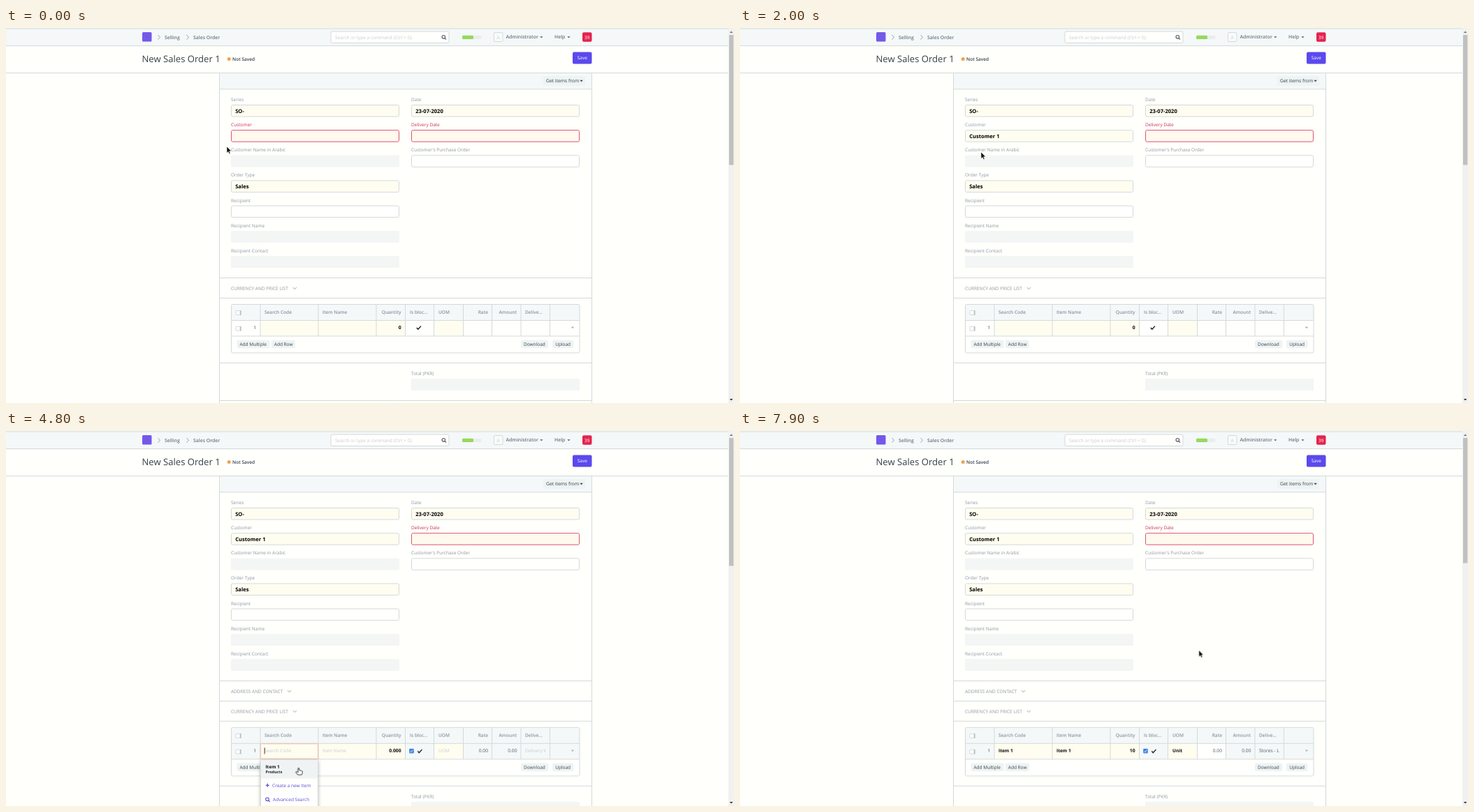
These frames come from a looping animation (1042x538 px, 8000 ms). An HTML page:

```html
<!DOCTYPE html>
<html lang="en">
<head>
<meta charset="utf-8">
<title>Sales order form</title>
<style>
  html, body { margin: 0; width: 100%; height: 100%; overflow: hidden; background: #fffffc; }
  svg { display: block; width: 100%; height: 100%; }
  text { font: 6.55px "Open Sans", "Noto Sans", sans-serif; fill: #36414c; text-rendering: geometricPrecision; white-space: pre; }
  .label { fill: #8d98a3; }
  .error { fill: #cf2f55; }
  .value { font-size: 7.6px; font-weight: 700; fill: #000; }
  .cell { font-size: 6.5px; font-weight: 700; fill: #000; }
  .qty { font-size: 6.75px; font-weight: 700; fill: #000; }
  .plain { font-size: 6.7px; fill: #4a535c; }
  .head { font-weight: 600; fill: #87929d; }
  .nav { font-size: 6.9px; font-weight: 600; fill: #6c7680; }
  .button { font-size: 6.5px; font-weight: 500; }
  .section { font-size: 6.5px; fill: #8d98a3; }
  .hint { fill: #c6ccce; }
  .option { font-size: 6.4px; font-weight: 700; fill: #111; }
  .detail { font-size: 5.53px; fill: #222; }
  .link { fill: #5b4fd8; }
  .end { text-anchor: end; }
  .line { fill: none; stroke: #d3dad9; }
  .icon { fill: none; stroke: #8d98a3; stroke-width: .9; }
  .popup { filter: drop-shadow(0 2px 2.5px rgba(0, 0, 0, .3)); }
</style>
</head>
<body>
<svg id="stage" viewBox="0 0 1042 538" xmlns="http://www.w3.org/2000/svg"></svg>
<script>
const LOOP = 8000;
const GREY = '#f4f8f8', CREAM = '#fffdf0', WHITE = '#fffffd', BORDER = '#d3dad9', PURPLE = '#5b49ee';

const text = (x, y, cls, str) => `<text x="${x}" y="${y}" class="${cls}">${str}</text>`;
const box = (x, y, w, h, fill, stroke = 'none', rx = 0, extra = '') =>
  `<rect x="${x}" y="${y}" width="${w}" height="${h}" fill="${fill}" stroke="${stroke}" rx="${rx}" ${extra}/>`;
const path = (d, cls, extra = '') => `<path d="${d}" class="${cls}" ${extra}/>`;
const rule = y => path(`M305.5 ${y}H838.5`, 'line');
const caret = (x, y) => box(x, y, .8, 9, '#000');
const button = (x, y, w, str) => box(x - 4, y - 8, w, 11.5, '#eef3f3', 'none', 2) + text(x, y, 'button', str);
const lens = (x, y, color) => `<g fill="none" stroke="${color}" stroke-width="1.1">` +
  `<circle cx="${x}" cy="${y}" r="2.3"/><path d="M${x + 1.7} ${y + 1.7}l2 2"/></g>`;
const plus = (x, y) => path(`M${x - 2.5} ${y}h5M${x} ${y - 2.5}v5`, '', 'stroke="#5b4fd8" stroke-width="1.3"');
const tick = (x, y) => path(`M${x - 3} ${y}l2 2.2l4.2 -4.6`, '', 'fill="none" stroke="#111" stroke-width="1.3"');
const caretDown = (x, y, color) => path(`M${x - 2.2} ${y}h4.4l-2.2 2.5z`, '', `fill="${color}"`);
const chevron = (x, y) => path(`M${x - 2.5} ${y - 1.2}l2.5 2.6l2.5 -2.6`, 'icon');

// Content shown only within the given [from, to) spans of the loop.
const during = (spans, ...parts) => `<g data-spans='${JSON.stringify(spans)}'>${parts.join('')}</g>`;

const LEFT = 322.5, RIGHT = 580.5;
const rowTop = i => 110.5 + i * 36.15;
const label = (x, i, str, cls = 'label') => text(x - .5, rowTop(i) - 5.6, cls, str);
const input = (x, i, fill, stroke = BORDER) => box(x, rowTop(i), 240, 16.5, fill, stroke, 2);
const value = (x, i, str) => text(x + 5.7, rowTop(i) + 11, 'value', str);
const readOnly = (x, y) => box(x - .5, y - .3, 241, 17, '#f4f5f5', 'none', 1.5);

function header() {
  return box(0, 0, 1035, 25.5, GREY) + path('M0 1H1035M0 25.5H1035M0 64.5H1035', 'line') +
    box(195, 6, 13.5, 13.5, '#7459e8', 'none', 1.5) +
    path('M217.5 10l3 3.3l-3 3.3M258.5 10l3 3.3l-3 3.3', 'icon') +
    text(227, 15.8, 'nav', 'Selling') + text(268, 15.8, 'nav', 'Sales Order') +
    box(465, 5, 169, 16.5, WHITE, BORDER, 2) +
    text(471, 15.7, 'hint', 'Search or type a command (Ctrl + G)') + lens(626.3, 12.8, '#555e66') +
    box(653, 10.8, 27.5, 5.2, '#e9eded', 'none', 1.5) + box(653, 10.8, 16, 5.2, '#98d85b', 'none', 1.5) +
    box(698.5, 6.5, 12.5, 13, '#f9fbfb', BORDER, 1.5) +
    `<text x="704.7" y="16" class="hint" text-anchor="middle">A</text>` +
    text(715.5, 15.3, 'nav', 'Administrator') + caretDown(766.3, 12, '#6c7680') +
    text(785, 15.3, 'nav', 'Help') + caretDown(805.5, 12, '#6c7680') +
    box(825, 6.3, 13.5, 13.5, '#e3244f', 'none', 2) +
    `<text x="831.7" y="15.5" text-anchor="middle" style="fill:#fff">39</text>` +
    `<text x="194.5" y="49" style="font-size:13.1px;font-weight:500">New Sales Order 1</text>` +
    '<circle cx="319.2" cy="44.6" r="2.5" fill="#f5a04c"/>' +
    `<text x="324" y="46.9" style="font-weight:600">Not Saved</text>` +
    box(811, 34.5, 27.5, 17, PURPLE, 'none', 2) +
    `<text x="824.8" y="45.2" text-anchor="middle" style="fill:#fff">Save</text>`;
}

function form() {
  const red = '#dd5570';
  return box(306, 65, 532, 23, GREY) + path('M305.5 64.5V538M838.5 64.5V538', 'line') + rule(87.8) +
    box(769, 69, 60, 13.5, '#eef3f3', 'none', 2) +
    `<text x="773" y="78" class="button" style="font-size:6.75px">Get items from</text>` + caretDown(823.6, 74.8, '#36414c') +
    label(LEFT, 0, 'Series') + input(LEFT, 0, CREAM) + value(LEFT, 0, 'SO-') +
    label(RIGHT, 0, 'Date') + input(RIGHT, 0, CREAM) + value(RIGHT, 0, '23-07-2020') +
    during([[0, 2000]], label(LEFT, 1, 'Customer', 'error'), input(LEFT, 1, '#fff9ee', red)) +
    during([[400, 2000]], box(LEFT, rowTop(1), 240, 16.5, 'none', '#f7c5cd', 2, 'stroke-width="3.5"'),
      input(LEFT, 1, '#fffaf0', '#d23455')) +
    during([[500, 900], [1500, 2000]], caret(328.4, 150)) +
    during([[2000, LOOP]], label(LEFT, 1, 'Customer'), input(LEFT, 1, CREAM), value(LEFT, 1, 'Customer 1')) +
    during([[2300, 3300]], path('M553.3 154.8h4.2', '', 'stroke="#111" stroke-width="1.7"') +
      path('M556 151.8l3.3 3l-3.3 3z', '', 'fill="#111"')) +
    label(RIGHT, 1, 'Delivery Date', 'error') + input(RIGHT, 1, '#fff9ee', red) +
    label(LEFT, 2, 'Customer Name in Arabic') + readOnly(LEFT, rowTop(2)) +
    label(RIGHT, 2, 'Customer\u2019s Purchase Order'.replace('\u2019', "'")) + input(RIGHT, 2, WHITE) +
    label(LEFT, 3, 'Order Type') + input(LEFT, 3, CREAM) + value(LEFT, 3, 'Sales') +
    label(LEFT, 4, 'Recipient') + input(LEFT, 4, WHITE) +
    label(LEFT, 5, 'Recipient Name') + readOnly(LEFT, rowTop(5)) +
    label(LEFT, 6, 'Recipient Contact') + readOnly(LEFT, rowTop(6)) +
    rule(358.5) +
    during([[2100, LOOP]], text(322, 375.8, 'section', 'ADDRESS AND CONTACT'), chevron(405.5, 373.3), rule(387.5));
}

const COLS = [322.5, 364, 447, 530, 571.5, 612.5, 654.5, 695.5, 737, 778.5, 821];
const HEAD_Y = 397, ROW_Y = 419.5, BASE = 432.3;

const fills = colors => colors.map((c, i) =>
  box(COLS[i], ROW_Y, COLS[i + 1] - COLS[i], 22.5, c)).join('');
const rowCheck = y => box(329, y, 6, 6, WHITE, '#c5cbcc', 1, 'stroke-width=".7"') + box(335.3, y - .3, 1.2, 6.8, '#a9b0b3');

function table() {
  const W = WHITE, C = CREAM, G = GREY;
  const heads = [[370, 'Search Code'], [453, 'Item Name'], [565.5, 'Quantity', 1], [578, 'Is bloc...'],
    [619, 'UOM'], [690, 'Rate', 1], [731, 'Amount', 1], [743, 'Delive...']];
  const zero = text(690, BASE, 'plain end', '0.00') + text(731.5, BASE, 'plain end', '0.00');
  return text(322, 375.8, 'section', 'CURRENCY AND PRICE LIST') + chevron(413.3, 373.3) + rule(387.5) +
    box(322.5, HEAD_Y, 498.5, 69, WHITE, 'none', 2) + box(322.5, HEAD_Y, 498.5, 22.5, GREY) +
    during([[0, 2100]], fills([W, C, C, C, W, C, W, W, W, W])) +
    during([[2100, 5300]], fills([G, C, C, C, G, C, G, G, G, G])) +
    during([[5300, LOOP]], fills([G, C, C, C, G, C, W, G, G, G])) +
    path(COLS.slice(1, -1).map(x => `M${x} ${HEAD_Y}V442`).join('') + 'M322.5 419.5H821M322.5 442H821', 'line') +
    box(322.5, HEAD_Y - .5, 498.5, 69.5, 'none', BORDER, 2) +
    heads.map(([x, str, end]) => text(x, 409.6, end ? 'head end' : 'head', str)).join('') +
    rowCheck(405.5) + rowCheck(428.3) + text(354.2, BASE, '', '1') + caretDown(811, 428.8, '#a9b0b3') +
    during([[0, 3300]], text(565.5, BASE, 'qty end', '0'), tick(590.8, 430)) +
    during([[3300, LOOP]], box(577.2, 427, 6.6, 6.6, '#3a80e0', 'none', 1),
      path('M578.7 430.3l1.3 1.4l2.4 -2.9', '', 'fill="none" stroke="#fff"'), tick(592.3, 430.5), zero) +
    during([[3700, 5700]], box(364.3, 419.8, 82.4, 21.9, 'none', '#f0b9a4', 1)) +
    during([[3300, 5000]], text(370, BASE, 'hint', 'Search Code')) +
    during([[3700, 5000]], caret(369.7, 425.5)) +
    during([[3300, 5300]], text(453, BASE, 'hint', 'Item Name'), text(565.5, BASE, 'qty end', '0.000'),
      text(619, BASE, 'hint', 'UOM'), `<g clip-path="url(#cellClip)">${text(743, BASE, 'hint', 'Delivery W')}</g>`) +
    during([[5000, LOOP]], text(370, BASE, 'cell', 'Item 1')) +
    during([[5300, LOOP]], text(453, BASE, 'cell', 'Item 1'), text(619, BASE, 'cell', 'Unit'),
      text(743, BASE, 'plain', 'Stores - L')) +
    during([[5300, 6800]], text(565.5, BASE, 'qty end', '1.000')) +
    during([[5800, 6000]], caret(547.9, 425.5)) +
    during([[6000, 6800]], box(548, 426, 18, 8.5, '#3390ff'),
      `<text x="565.5" y="${BASE}" class="qty end" style="fill:#fff">1.000</text>`) +
    during([[6800, 7000]], text(565.5, BASE, 'qty end', '1')) +
    during([[7000, LOOP]], text(565.5, BASE, 'qty end', '10')) +
    during([[6800, 7600]], caret(565.7, 425.5)) +
    button(334.5, 455.8, 47, 'Add Multiple') + button(383.8, 455.8, 34, 'Add Row') +
    button(741, 455.8, 39, 'Download') + button(786.2, 455.8, 30, 'Upload') +
    rule(480.5) + text(580, 497.8, 'label', 'Total (PKR)') + readOnly(RIGHT, 503.3) + rule(534.5);
}

function customerMenu() {
  return box(322.5, 165.5, 240, 95.5, WHITE, '#d9dede', 1, 'class="popup"') + box(323, 166, 239, 27, '#f0f3f3') +
    text(329.5, 178, 'option', 'Customer 1') + text(329.5, 184.8, 'detail', 'Commercial, Pakistan') +
    text(329.5, 205, 'option', 'Guest') + text(329.5, 211.8, 'detail', 'Individual, All Territories') +
    plus(332.3, 229.8) + text(339, 232, 'link', 'Create a new Customer') +
    lens(332, 249.8, '#5b4fd8') + text(340, 252.4, 'link', 'Advanced Search');
}

function itemMenu() {
  return box(364.5, 471.5, 82, 80, WHITE, '#d9dede', 1, 'class="popup"') + box(365, 472, 81, 26.5, '#f0f3f3') +
    text(371.5, 483.8, 'option', 'Item 1') +
    `<text x="371.5" y="490.5" class="detail" style="font-weight:700;font-size:5.4px">Products</text>` +
    plus(374.3, 508.3) + text(381, 510.6, 'link', 'Create a new Item') +
    lens(374, 528.3, '#5b4fd8') + text(382, 531, 'link', 'Advanced Search');
}

function scrollbar() {
  const thumb = bottom => box(1035, 10, 6.3, bottom - 10, '#bfc1c0');
  return box(1034, 0, 8, 538, '#f0f1f0') + path('M1035.8 7l2.3-2.6l2.3 2.6z', '', 'fill="#777"') +
    path('M1035.8 532l2.3 2.6l2.3-2.6z', '', 'fill="#333"') +
    during([[0, 2100]], thumb(196.5)) + during([[2100, 5300]], thumb(193.5)) + during([[5300, LOOP]], thumb(189.5));
}

const POINTERS = {
  arrow: '<path d="M0 0V9.3L2.1 7.4L3.6 10.6L5.1 9.9L3.7 6.8H6.5Z" fill="#111" stroke="#fff" stroke-width=".5"/>',
  beam: '<path d="M-2-4.6H-.6L0-4.2L.6-4.6H2M0-4.2V4.2M-2 4.6H-.6L0 4.2L.6 4.6H2" fill="none" stroke="#222" stroke-width="1"/>',
  hand: '<path d="M-.9 .7Q0-.4 .9 .7V3.6Q1.9 3 2.6 4Q3.6 3.5 4.2 4.5Q5.4 4.2 5.5 5.4V7.3L4.4 10H-1.2L-4 6.6Q-4.2 5.2-2.8 5.5L-.9 6.7Z" fill="#fff" stroke="#222" stroke-width=".9"/>'
};

// time, shape, x, y
const MOVES = [
  [0, 'arrow', 316, 170], [100, 'arrow', 320, 161], [300, 'beam', 327, 156], [400, 'beam', 335, 154],
  [500, 'beam', 340, 154], [1300, 'beam', 343, 158], [1400, 'arrow', 343, 163], [1600, 'arrow', 344, 169],
  [1800, 'arrow', 345, 175], [1900, 'arrow', 345, 178], [2300, 'arrow', 352, 205], [2400, 'arrow', 376, 300],
  [2500, 'arrow', 410, 410], [2600, 'hand', 429.5, 461.5], [2800, 'hand', 428.5, 461.3],
  [3400, 'beam', 427, 464], [3900, 'beam', 427, 463.5], [4400, 'beam', 426, 467], [4500, 'hand', 424, 473],
  [4700, 'hand', 420, 481], [4800, 'hand', 418.8, 483.2], [5100, 'arrow', 418.8, 483.2], [5600, 'arrow', 432, 482],
  [5700, 'arrow', 480, 472], [5800, 'beam', 534, 461], [5900, 'beam', 538, 459.6], [6300, 'none', 0, 0],
  [7600, 'arrow', 552, 442], [7700, 'arrow', 598, 386], [7800, 'arrow', 642, 334], [7900, 'arrow', 656.8, 314.6]
];

const stage = document.getElementById('stage');
stage.innerHTML =
  '<clipPath id="cellClip"><rect x="742" y="420" width="30.5" height="22"/></clipPath>' +
  header() + form() + `<g id="lower">${table()}</g>` +
  during([[1500, 2000]], customerMenu()) + during([[4300, 5000]], itemMenu()) + scrollbar() +
  Object.entries(POINTERS).map(([name, art]) => `<g id="${name}">${art}</g>`).join('');

// Each step is [time, style]; styles hold until the next step.
function playSteps(el, steps) {
  const frames = steps.map(([time, style]) => ({ offset: time / LOOP, easing: 'step-end', ...style }));
  if (frames[frames.length - 1].offset < 1) frames.push({ ...frames[frames.length - 1], offset: 1 });
  el.animate(frames, { duration: LOOP, iterations: Infinity });
}

for (const el of stage.querySelectorAll('[data-spans]')) {
  const spans = JSON.parse(el.dataset.spans);
  const steps = spans[0][0] > 0 ? [[0, { opacity: 0 }]] : [];
  for (const [from, to] of spans) steps.push([from, { opacity: 1 }], [to, { opacity: 0 }]);
  playSteps(el, steps);
}

playSteps(document.getElementById('lower'), [
  [0, { transform: 'translate(0px, 0px)' }], [2100, { transform: 'translate(0px, 28.8px)' }]
]);

for (const name of Object.keys(POINTERS)) {
  playSteps(document.getElementById(name), MOVES.map(([time, shape, x, y]) =>
    [time, { opacity: shape === name ? 1 : 0, transform: `translate(${x}px, ${y}px)` }]));
}
</script>
</body>
</html>
```
